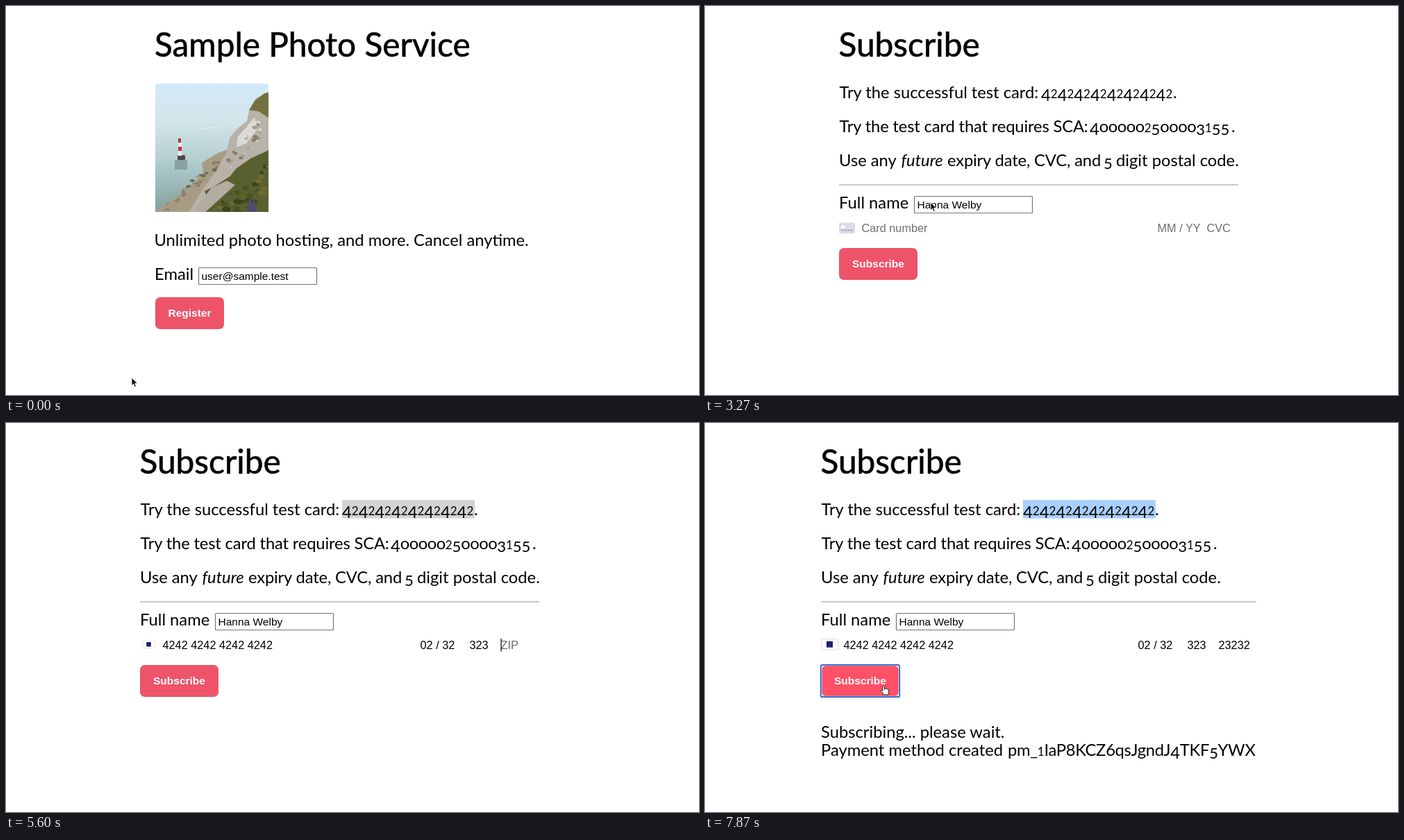
An HTML page that plays this animation: 998x561 px, repeating every 8000 ms.

```html
<!DOCTYPE html>
<html lang="en">
<head>
<meta charset="utf-8">
<title>Subscription sign-up</title>
<style>
html, body { margin: 0; width: 100%; height: 100%; overflow: hidden; background: #fff; }
svg { display: block; width: 998px; height: 561px; }
text { font-family: Lato, sans-serif; font-size: 23.75px; fill: #000; white-space: pre; }
.h1 { font-size: 47.8px; stroke: #000; stroke-width: .6px; }
.h2 { font-size: 27.6px; stroke: #000; stroke-width: .35px; }
.it { font-style: italic; }
.link { fill: #551a8b; letter-spacing: .4px; }
.input, .btn, .field { font-family: "Liberation Sans", Arial, sans-serif; }
.input { font-size: 15.5px; }
.btn { font-size: 15.5px; font-weight: bold; fill: #fff; text-anchor: middle; }
.field { font-size: 16.3px; }
</style>
</head>
<body>
<svg id="stage" viewBox="0 0 998 561"></svg>
<script>
const stage = document.getElementById('stage');
const LOOP = 8000, STEP = 1000 / 15;

// Old-style figures: 0-2 at x-height, 3, 4, 5, 7 and 9 hang below the baseline.
function figures(s) {
  if (!/\d/.test(s)) return s;
  let last = 0;
  return s.match(/\d|\D+/g).map(c => {
    const drop = /^[34579]$/.test(c) ? 4 : 0;
    const size = /^[12]$/.test(c) ? 17 : /^[35]$/.test(c) ? 22 : 23.75;
    const gap = c === '0' ? ' letter-spacing="-.5"' : '';
    const out = `<tspan dy="${drop - last}" font-size="${size}"${gap}>${c === '0' ? 'o' : c}</tspan>`;
    last = drop;
    return out;
  }).join('');
}

const text = (x, y, s, cls = '', gap = 0) =>
  `<text x="${x}" y="${y}" class="${cls}" aria-label="${s}"${gap ? ` letter-spacing="${gap}"` : ''}>` +
  (/input|btn|field/.test(cls) ? s : figures(s)) + '</text>';

const box = (x, y, w, h, fill, more = '') =>
  `<rect x="${x}" y="${y}" width="${w}" height="${h}" fill="${fill}" ${more}/>`;

const poly = (points, fill) => `<polygon points="${points}" fill="${fill}"/>`;

const input = (x, y, s) =>
  box(x + .5, y + .5, 170, 24, '#fff', 'stroke="#767676" stroke-width="1.2" rx="1"') +
  text(x + 4.5, y + 18, s, 'input');

const button = (id, x, y, w, s) =>
  `<g id="${id}Ring">` +
  box(x - .2, y - .2, w + .4, 46.4, '#fff', 'rx="2.5" stroke="#1b57c5" stroke-width="1.7"') + '</g>' +
  `<rect id="${id}" x="${x}" y="${y}" width="${w}" height="46" rx="7"/>` +
  text(x + w / 2, y + 28, s, 'btn');

function photo() {
  let seed = 7, rocks = '';
  const rnd = () => (seed = seed * 16807 % 2147483647) / 2147483647;
  const speck = (x, y, r, fill) =>
    `<ellipse cx="${x}" cy="${y}" rx="${r * 1.5}" ry="${r}" fill="${fill}"/>`;
  for (let i = 0; i < 60; i++) {
    const u = rnd();
    rocks += speck(228 + u * 82, 293 - u * 70 + (rnd() - .5) * 14, .7 + rnd() * 1.6,
      ['#6f6b5c', '#a99c83', '#8a8370'][i % 3]);
  }
  for (let i = 0; i < 45; i++) {
    const u = rnd();
    rocks += speck(298 + u * 80, 290 - u * 62 + rnd() * 40, 1 + rnd() * 3,
      ['#4a5527', '#6d6b32', '#39441f'][i % 3]);
  }
  for (let i = 0; i < 28; i++) {
    const u = rnd();
    rocks += speck(318 + u * 50, 222 - u * 62 + rnd() * 28, .8 + rnd() * 2,
      ['#a79d91', '#d8d4cc', '#867c6d'][i % 3]);
  }
  return `<defs>
    <linearGradient id="sea" x1="0" y1="0" x2="0" y2="1">
      <stop offset="0" stop-color="#d3ebf8"/><stop offset=".3" stop-color="#d2e5ea"/>
      <stop offset=".6" stop-color="#b3cdd0"/><stop offset="1" stop-color="#82a09c"/>
    </linearGradient>
    <clipPath id="frame"><rect x="215" y="112" width="163" height="185"/></clipPath>
    <filter id="soft"><feGaussianBlur stdDeviation=".7"/></filter></defs>
    <g clip-path="url(#frame)">` + box(215, 112, 163, 185, 'url(#sea)') + '<g filter="url(#soft)">' +
    poly('215,297 232,284 262,266 284,240 282,226 305,212 325,205 330,297', '#a79c83') +
    poly('382,122 360,133 350,150 347,166 334,176 322,190 318,210 305,234 292,252 276,276 262,300 382,300', '#b9b2a8') +
    poly('358,160 345,176 334,188 332,204 346,198 362,178', '#dcdad5') +
    poly('382,124 372,126 358,137 350,150 364,152 382,164', '#75703f') +
    poly('382,206 352,220 332,234 322,246 300,260 286,267 290,278 276,300 382,300', '#59602f') +
    poly('296,262 318,252 330,258 306,280 284,300 266,300', '#b3aca0') + rocks +
    '<path d="M276 178l34-5" stroke="#e6f0f2" stroke-width="1.2"/>' +
    poly('346,297 350,276 354,284 358,278 362,297', '#4d4d66') +
    box(243, 222, 18, 14, '#86a3a5') + '</g>' +
    box(247, 215, 11, 7, '#4d4646', 'rx="1.5"') + box(248, 197, 5, 19, '#f3eeec') +
    box(248, 191, 4, 6, '#a8393c') + box(248, 203, 5, 6, '#c23439') +
    '</g>';
}

const plan = (x, w, name, price, slash) =>
  box(x + .5, 111.5, w, 206, 'none', 'stroke="#222"') +
  text(x + 23.5, 187, name, 'h2') +
  text(x + 23.5, 240, price) + text(slash, 240, '/') + text(slash + 18, 240, 'month', '', -.2) +
  text(x + 23.5, 289, 'Select', 'link') +
  box(x + 24, 291, 66, 1.5, '#551a8b');

const grey = '#6e6e6e';

stage.innerHTML =
  '<g id="home">' + text(214, 73, 'Sample Photo Service', 'h1') + photo() +
  text(213.5, 346, 'Unlimited photo hosting, and more. Cancel anytime.') +
  text(214, 395, 'Email') + input(277, 377, 'user@sample.test') +
  button('register', 215, 420, 99, 'Register') + '</g>' +

  '<g id="plans">' + text(253.5, 73, 'Select a plan', 'h1', .6) +
  plan(266, 197.5, 'Basic', '$5.00', 354.5) + plan(488, 207, 'Premium', '$15.00', 586) + '</g>' +

  '<g id="pay"><g id="left">' + text(192.5, 73, 'Subscribe', 'h1') +
  '<rect id="mark" x="484" y="111" width="191" height="26.5"/>' +
  text(193.5, 132.5, 'Try the successful test card:') +
  text(484, 132.5, '4242424242424242') + text(674, 132.5, '.') +
  text(193.5, 181.5, 'Try the test card that requires SCA:', '', -.15) +
  text(554, 181.5, '4000002500003155') + text(758, 181.5, '.') +
  text(193, 230.5, 'Use any') + text(282.5, 230.5, 'future', 'it') +
  text(349, 230.5, 'expiry date, CVC, and', '', -.15) + text(574, 230.5, '5') +
  text(592, 230.5, 'digit postal code.') +
  text(193, 292, 'Full name') + input(301, 274, 'Hanna Welby') +
  '<g id="blank">' + box(193, 312.5, 23, 15.5, '#dadaea', 'rx="2"') +
  box(196, 316.5, 6, 4, '#fff', 'rx="1"') +
  '<path d="M196 323.5h17" stroke="#9b9bb4" stroke-width="1.5" stroke-dasharray="3.5 1"/></g>' +
  '<g id="brand">' + box(193.5, 311.5, 24, 15.5, '#fff', 'rx="2" stroke="#dcdce2"') +
  box(201, 314.7, 9, 9, '#1a1f71') + '</g>' +
  text(225.5, 326, 'Card number', 'field').replace('<text', '<text id="number"') +
  button('send', 193, 349, 113, 'Subscribe') +
  '<g id="wait">' + text(193, 454, 'Subscribing... please wait.') + '</g>' +
  '<g id="done">' + text(193, 480, 'Payment method created') +
  text(462, 480, 'pm_1IaP8KCZ6qsJgndJ4TKF5YWX', '', -.3) + '</g></g>' +
  '<g id="rule">' + box(193, 257.3, 575, 1.2, '#a4a4a4') + box(193, 258.5, 575, .8, '#e4e4e4') + '</g>' +
  '<g id="right">' + ['date', 'code', 'zip'].map(k => `<text id="${k}" y="326" class="field"></text>`).join('') +
  '</g><rect id="caret" y="311" width="1.2" height="18.5"/></g>' +

  '<path id="arrow" d="M0 0v11.5l2.6-2.4 1.9 4.4 2-.9-1.9-4.2h3.6z" fill="#111" stroke="#fff" stroke-width=".8"/>' +
  '<path id="hand" d="M-1.5 1q1.4-1.8 2.4 0l1 4.2 .2-1.4q1.4-.7 1.8.6 1.2-.8 1.8.6 1.3-.5 1.6.8l.5 3.2-1.2 4h-6.3l-1.4-2.8-3.1-2.7q0-2 1.8-1.2l1.6 1.3z" fill="#fff" stroke="#222" stroke-width="1"/>' +
  '<path id="beam" d="M-2-6.5q2 0 2 1.5v10q0 1.5-2 1.5M2-6.5q-2 0-2 1.5M2 6.5q-2 0-2-1.5M-1.2 2h2.4" fill="none" stroke="#333" stroke-width="1"/>';

const el = {};
stage.querySelectorAll('[id]').forEach(n => el[n.id] = n);

const show = (id, on) => el[id].setAttribute('display', on ? 'inline' : 'none');
const move = (id, x, y = 0) => el[id].setAttribute('transform', `translate(${x} ${y})`);
const ramp = (t, a, b) => Math.max(0, Math.min(1, (t - a) / (b - a)));
const ease = u => u * u * (3 - 2 * u);

// Pointer keys: time, x, y, kind of pointer from then on.
const path = [
  [0, 181, 536, 'arrow'], [70, 181, 536, 'arrow'], [600, 264.5, 446, 'arrow'],
  [800, 267, 443, 'hand'], [1670, 264, 443, 'arrow'], [2000, 264, 443, 'arrow'],
  [2540, 325, 283, 'hand'], [3130, 325, 283, 'arrow'], [3260, 325, 283, 'arrow'],
  [3870, 270, 319, 'beam'], [3940, 270, 319, 'beam'], [4130, 535, 125, 'beam'],
  [4310, 535, 125, 'arrow'], [4540, 212, 419, 'arrow'], [4670, 240, 320, 'beam'],
  [4870, 240, 320, ''], [6130, 240, 322, 'beam'], [6270, 252, 356, 'hand'],
  [6400, 259, 379, 'hand'], [7600, 259, 379, 'hand'], [7730, 257, 379, 'hand'], [LOOP, 257, 379, 'hand']
];

function pointer(t) {
  let i = 0;
  while (i < path.length - 2 && path[i + 1][0] <= t) i++;
  const [t0, x0, y0, kind] = path[i], [t1, x1, y1] = path[i + 1];
  const still = !kind || t0 === 600 || t0 === 800;
  const u = still ? 0 : ease(ramp(t, t0, t1));
  for (const k of ['arrow', 'hand', 'beam']) show(k, k === kind);
  if (kind) move(kind, x0 + (x1 - x0) * u, y0 + (y1 - y0) * u);
}

function paint(id, hover, focus) {
  const mix = (a, b) => Math.round(a + (b - a) * hover);
  el[id].setAttribute('fill', `rgb(${mix(237, 254)},${mix(84, 80)},${mix(105, 102)})`);
  el[id].setAttribute('rx', focus ? 5.5 : 7);
  const r = el[id], inset = focus ? 1 : 0;
  r.style.transformBox = 'fill-box';
  r.style.transformOrigin = 'center';
  r.style.transform = inset ? 'scale(.975,.945)' : 'none';
  show(id + 'Ring', focus);
}

function put(id, x, value, hint) {
  el[id].setAttribute('x', x);
  el[id].textContent = value || hint;
  el[id].style.fill = value ? '#000' : grey;
}

const typed = (s, times, t) => s.slice(0, times.filter(k => k <= t).length);

function form(t) {
  const pasted = t >= 4870, finished = t >= 7600;
  const slide = 55 * ease(ramp(t, 4800, 5070));
  put('number', 225.5, pasted ? '4242 4242 4242 4242' : '', 'Card number');

  const d = typed('0232', [5070, 5130, 5270, 5330], t);
  const date = d.length < 2 ? d : d.slice(0, 2) + ' / ' + d.slice(2);
  const code = typed('323', [5400, 5470, 5600], t);
  const zip = typed('23232', [5670, 5730, 5800, 5870, 5930], t);
  put('date', 651.5 - slide, date, 'MM / YY');
  put('code', 722.5 - slide, code, 'CVC');
  put('zip', 767.5 - slide, zip, 'ZIP');
  el.zip.setAttribute('opacity', slide / 55);

  // The brand gives way to the plain card while the code is being typed.
  const flip = t >= 5330 && t < 5600;
  const size = t < 5330 ? .6 + .4 * ramp(t, 4870, 5000) : .73 + .27 * ramp(t, 5605, 5735);
  show('blank', !pasted || flip);
  show('brand', pasted && !flip);
  el.brand.setAttribute('transform', `translate(205.5 319.3) scale(${size}) translate(-205.5 -319.3)`);

  const focus = t < 4670 ? '' : t < 5000 ? 'number' : t < 5400 ? 'date' : t < 5600 ? 'code' : t < 6870 ? 'zip' : '';
  show('caret', focus && !(t >= 6170 && t < 6670));
  if (focus) {
    const f = el[focus];
    const empty = f.style.fill !== 'rgb(0, 0, 0)';
    el.caret.setAttribute('x', +f.getAttribute('x') + (empty ? 0 : f.getComputedTextLength() + .5));
  }

  show('mark', t >= 4270);
  el.mark.setAttribute('fill', t >= 4670 && t < 6870 ? '#d3d3d3' : '#a9cffc');
  paint('send', ramp(t, 6200, 6400), t >= 6870);
  show('wait', t >= 7000);
  show('done', finished);
  move('left', finished ? -26 : 0);
  move('right', finished ? 27 : 0);
  el.rule.setAttribute('transform', finished ? 'translate(-43.4 0) scale(1.0904 1)' : '');
}

function draw(ms) {
  const t = Math.floor((ms % LOOP + 4) / STEP) * STEP + 5;
  show('home', t < 1670);
  show('plans', t >= 1670 && t < 3130);
  show('pay', t >= 3130);
  paint('register', ramp(t, 735, 870), t >= 1200);
  form(t);
  pointer(t);
}

const start = performance.now();
function tick(now) {
  draw(Math.max(0, now - start));
  requestAnimationFrame(tick);
}
draw(0);
requestAnimationFrame(tick);
</script>
</body>
</html>
```
